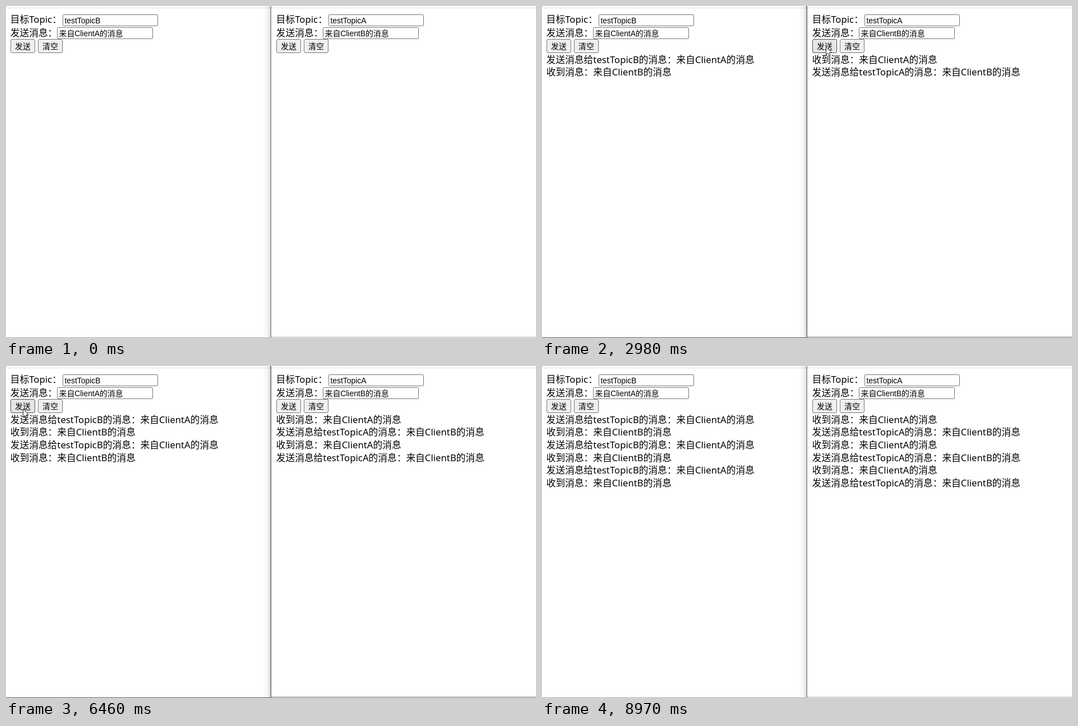
These frames come from a looping animation (945 px wide and 593 px high, 9.45 s). An HTML page:

```html
<!DOCTYPE html>
<html lang="zh-CN">
<head>
<meta charset="utf-8">
<title>消息收发</title>
<style>
  html, body { margin: 0; width: 100%; height: 100%; overflow: hidden; background: #fff; }
  svg { display: block; width: 945px; height: 593px; }
  text { white-space: pre; fill: #000; }
  .body { font: 16.67px "Noto Sans", "Noto Sans CJK SC", sans-serif; letter-spacing: .05px; }
  .ui { font: 13.89px "Liberation Sans", "Noto Sans CJK SC", sans-serif; }
  .field { fill: #fff; stroke: #767676; }
  .button { fill: #efefef; stroke: #767676; }
  .button.hover { fill: #e5e5e5; stroke: #4f4f4f; }
  .button.active { fill: #f5f5f5; stroke: #8d8d8d; }
  .edge { fill: #a8a8a8; }
  .divider { fill: #858585; }
  .edge.dark, .divider.dark { fill: #585858; }
</style>
</head>
<body>
<svg id="stage" viewBox="0 0 945 593">
  <defs>
    <linearGradient id="fadeLeft">
      <stop offset="0" stop-opacity="0"/>
      <stop offset=".6" stop-opacity=".04"/>
      <stop offset="1" stop-opacity=".15"/>
    </linearGradient>
    <linearGradient id="fadeRight">
      <stop offset="0" stop-opacity=".15"/>
      <stop offset=".4" stop-opacity=".04"/>
      <stop offset="1" stop-opacity="0"/>
    </linearGradient>
  </defs>
  <rect y="3" width="945" height="1" fill="#dcdcdc"/>
  <g id="panes"></g>
  <rect id="shadowLeft" x="457" width="15" height="592" fill="url(#fadeLeft)"/>
  <rect id="shadowRight" x="473" width="17" height="591" fill="url(#fadeRight)"/>
  <rect id="edgeLeft" class="edge" y="592" width="472" height="1"/>
  <rect id="edgeRight" class="edge" x="472" y="591" width="473" height="1"/>
  <rect id="divider" class="divider" x="471.6" width="1.4" height="592"/>
  <circle id="spot" r="11.5" fill="#eeee28" fill-opacity=".68"/>
  <path id="arrow" d="M.5 .5V15.5L3.8 12.3L6.2 17.5L8.2 16.6L6 11.5H10.5Z" fill="#fff" stroke="#222" stroke-linejoin="round"/>
  <path id="beam" d="M-2.5 -7.5H-.8L0 -6.7L.8 -7.5H2.5M0 -6.7V6.7M-2.5 7.5H-.8L0 6.7L.8 7.5H2.5" fill="none" stroke="#222"/>
</svg>
<script>
const LOOP = 9450;
const $ = id => document.getElementById(id);

function add(parent, tag, attrs, content = '') {
  const el = document.createElementNS('http://www.w3.org/2000/svg', tag);
  for (const key in attrs) el.setAttribute(key, attrs[key]);
  el.textContent = content;
  parent.append(el);
  return el;
}

function makePane(x, self, other, sendsFirst) {
  const pane = add($('panes'), 'g', { transform: `translate(${x} 0)` });
  const label = (x, y, s) => add(pane, 'text', { class: 'body', x, y }, s);
  const caption = (x, y, s) => add(pane, 'text', { class: 'ui', x, y }, s);
  const field = (x, y, w, s) => {
    add(pane, 'rect', { class: 'field', x, y, width: w, height: 20, rx: 1 });
    caption(x + 3, y + 15, s);
  };
  const button = (x, s) => {
    const el = add(pane, 'rect', { class: 'button', x, y: 59.5, width: 43, height: 24, rx: 2.5 });
    caption(x + 7.6, 77.4, s);
    return el;
  };
  label(7.8, 30, '目标Topic：');
  field(101.5, 15.5, 169, 'testTopic' + other);
  label(7.8, 53.7, '发送消息：');
  field(91.5, 38.5, 170, `来自Client${self}的消息`);
  const send = button(8.5, '发送');
  const clear = button(57.5, '清空');
  const lines = [];
  for (let i = 0; i < 6; i++) {
    const sent = (i % 2 === 0) === sendsFirst;
    const s = sent
      ? `发送消息给testTopic${other}的消息：来自Client${self}的消息`
      : `收到消息：来自Client${other}的消息`;
    lines.push(label(7.8, 101.8 + i * 22.67, s));
  }
  return { send, clear, lines };
}

const left = makePane(0, 'A', 'B', true);
const right = makePane(474, 'B', 'A', false);
const buttons = { send: left.send, clear: left.clear, reply: right.send };

// at: start in ms, front: focused window, count: visible messages
const steps = [
  { at: 0 },
  { at: 500, arrow: [372, 304] },
  { at: 970 },
  { at: 1470, front: 'L', count: 0, arrow: [26, 70], spot: [26, 71], hover: 'send' },
  { at: 1980, front: 'L', count: 1, arrow: [80, 76], hover: 'clear' },
  { at: 2480, front: 'L', count: 1, arrow: [510, 81], hover: 'reply' },
  { at: 2980, front: 'R', count: 2, arrow: [506, 72], hover: 'reply' },
  { at: 3470, front: 'R', count: 2, arrow: [37, 73], hover: 'send' },
  { at: 3970, front: 'R', count: 2, arrow: [32, 76], spot: [32, 76], hover: 'send' },
  { at: 4470, front: 'L', count: 3, beam: [87.5, 88.5] },
  { at: 4970, front: 'L', count: 3, arrow: [510, 82], hover: 'reply' },
  { at: 5460, front: 'R', count: 3, arrow: [509, 75], spot: [510, 75.5], active: 'reply' },
  { at: 5970, front: 'R', count: 4, arrow: [203, 83] },
  { at: 6460, front: 'R', count: 4, arrow: [30, 76], hover: 'send' },
  { at: 6960, front: 'L', count: 5, arrow: [350, 79] },
  { at: 7460, front: 'L', count: 5, arrow: [506, 81], hover: 'reply' },
  { at: 7960, front: 'R', count: 6, arrow: [506, 81], hover: 'reply' },
  { at: 8460, front: 'R', count: 6 },
  { at: 8970, count: 6 }
];

const show = (el, on) => el.setAttribute('visibility', on ? 'visible' : 'hidden');

function place(id, pos) {
  show($(id), pos);
  if (pos) $(id).setAttribute('transform', `translate(${pos})`);
}

function render(step) {
  const { at, front, count = 0, hover, active } = step;
  for (const id of ['arrow', 'beam', 'spot']) place(id, step[id]);
  for (const name in buttons) {
    buttons[name].classList.toggle('hover', name === hover);
    buttons[name].classList.toggle('active', name === active);
  }
  for (const pane of [left, right]) pane.lines.forEach((line, i) => show(line, i < count));
  show($('shadowLeft'), front !== 'L');
  show($('shadowRight'), front === 'L');
  $('divider').classList.toggle('dark', !!front);
  $('edgeLeft').classList.toggle('dark', !!front);
  $('edgeRight').classList.toggle('dark', !!front && at >= 2980);
}

let current;
const start = performance.now();
function tick() {
  const t = (performance.now() - start) % LOOP;
  const step = steps.findLast(s => s.at <= t);
  if (step !== current) render(current = step);
  requestAnimationFrame(tick);
}
tick();
</script>
</body>
</html>
```
